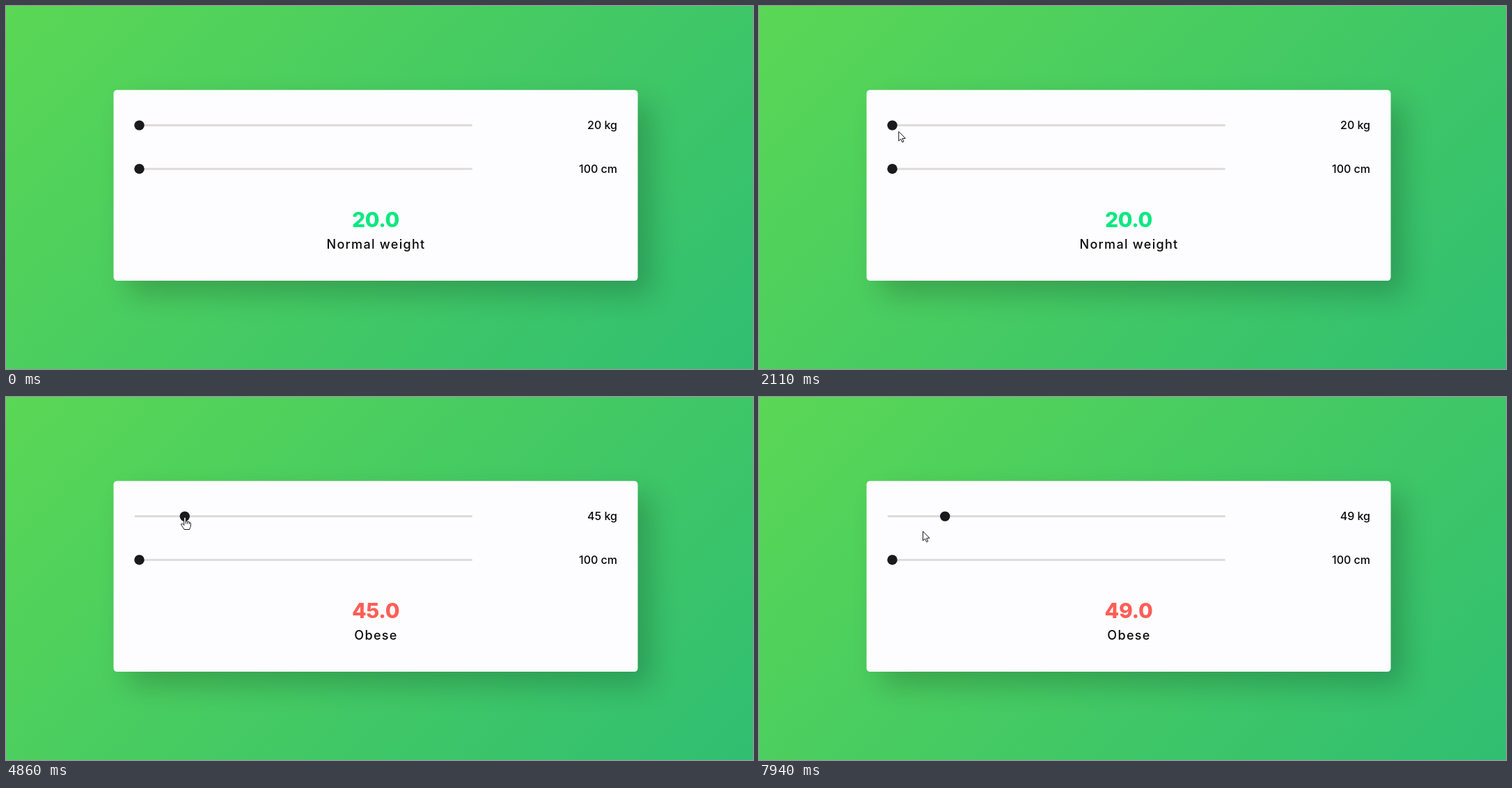
Animation, 1073 px wide and 522 px high, one loop 7.99 s. Source, as an HTML page:

```html
<!DOCTYPE html>
<html lang="en">
<head>
<meta charset="utf-8">
<title>BMI calculator</title>
<style>
  html, body {
    margin: 0;
    width: 100%;
    height: 100%;
    overflow: hidden;
  }
  body {
    position: relative;
    background: linear-gradient(135deg, #5ad755, #30be71);
  }
  .shadow {
    position: absolute;
    left: 155px;
    top: 121px;
    width: 752px;
    height: 274px;
    border-radius: 5px;
    box-shadow: 20px 20px 40px rgba(0, 0, 0, .2);
  }
  svg {
    position: absolute;
    left: 0;
    top: 0;
    width: 1073px;
    height: 522px;
  }
  text {
    font-family: Inter, "Open Sans", sans-serif;
    font-weight: 500;
    fill: #080808;
  }
  .value { font-size: 16px; text-anchor: end; }
  .bmi { font-size: 30px; font-weight: 800; letter-spacing: -.3px; text-anchor: middle; }
  .label { font-size: 18px; letter-spacing: 1.3px; text-anchor: middle; }
  .card { fill: #fdfdff; }
  .track { fill: #dedbd9; }
  .thumb { fill: #1a1a1c; }
  .cursor { fill: #fff; stroke: #16161c; stroke-width: 1; stroke-linejoin: round; stroke-linecap: round; }
</style>
</head>
<body>
<div class="shadow"></div>
<svg viewBox="0 0 1073 522">
  <rect class="card" x="154.5" y="120.7" width="753" height="274.4" rx="5"/>
  <rect class="track" x="184.5" y="170" width="485.5" height="3" rx="1.5"/>
  <rect class="track" x="184.5" y="232.7" width="485.5" height="3" rx="1.5"/>
  <circle class="thumb" id="weightThumb" cx="191.5" cy="171.6" r="7.2"/>
  <circle class="thumb" cx="191.5" cy="234.2" r="7.2"/>
  <text class="value" id="weight" x="878" y="177">20 kg</text>
  <text class="value" x="878" y="240">100 cm</text>
  <text class="bmi" id="bmi" x="531" y="318">20.0</text>
  <text class="label" id="label" x="531.5" y="349">Normal weight</text>
  <g class="cursor" id="cursor">
    <path id="arrow" d="M.5 .5V13.6L3.5 10.8 5.6 15.5 7.7 14.6 5.6 10H9.7Z"/>
    <g id="hand">
      <path d="M-1.4 9.5V1.2C-1.4-.4 1.2-.4 1.2 1.2V6C1.6 5 3.7 5.2 3.8 6.6C4.3 5.8 6.1 6 6.3 7.4C7.1 6.8 8.3 7.4 8.3 8.6V12C8.3 14.2 7 15 6.6 17.5H-1.1C-1.5 15.6-3.8 13.7-5.1 11.2C-6.1 9.4-4.2 8.2-2.9 9.6L-1.4 11.2Z"/>
      <path fill="none" d="M1.2 6V9M3.8 6.8V9.2M6.3 7.6V9.4"/>
    </g>
  </g>
</svg>
<script>
const LOOP = 7990;
const MIN_KG = 20;
const PX_PER_KG = 470 / 180;
const THUMB_START = 191.5;

// Each stop: time in ms, then the values reached at that time.
const pointer = [
  [640, 330, 530], [1200, 216, 200], [1390, 213, 193], [1800, 210, 190],
  [2350, 192.7, 173], [3050, 192.7, 173], [3970, 226.8, 173],
  [5200, 268.5, 173], [5950, 268.5, 173], [6500, 218, 216],
  [6680, 210, 223], [7050, 209, 223], [7650, 235, 193], [7990, 235, 193]
];
const drag = [[3050, 20], [3970, 33.2], [5200, 49]];

const levels = [
  [25, "Normal weight", "#0be881"],
  [30, "Overweight", "#ff884d"],
  [Infinity, "Obese", "#ff5e57"]
];

const el = id => document.getElementById(id);
const [thumb, weight, bmi, label, cursor, arrow, hand] =
  ["weightThumb", "weight", "bmi", "label", "cursor", "arrow", "hand"].map(el);

function sample(stops, t) {
  const next = stops.findIndex(s => s[0] > t);
  if (next === 0) return stops[0].slice(1);
  if (next < 0) return stops[stops.length - 1].slice(1);
  const a = stops[next - 1], b = stops[next];
  const k = (t - a[0]) / (b[0] - a[0]);
  return a.slice(1).map((v, i) => v + (b[i + 1] - v) * k);
}

const show = (node, on) => node.setAttribute("visibility", on ? "visible" : "hidden");

function draw(t) {
  const kg = Math.round(sample(drag, t)[0]);
  const [, name, color] = levels.find(l => kg < l[0]);
  const thumbX = THUMB_START + (kg - MIN_KG) * PX_PER_KG;
  thumb.setAttribute("cx", thumbX);
  weight.textContent = kg + " kg";
  bmi.textContent = kg.toFixed(1);
  bmi.style.fill = color;
  label.textContent = name;

  const [x, y] = sample(pointer, t);
  const visible = t >= pointer[0][0];
  const overThumb = Math.hypot(x - thumbX, y - 171.6) < 8;
  cursor.setAttribute("transform", `translate(${x} ${y})`);
  show(arrow, visible && !overThumb);
  show(hand, visible && overThumb);
}

function tick() {
  draw(performance.now() % LOOP);
  requestAnimationFrame(tick);
}
tick();
</script>
</body>
</html>
```
